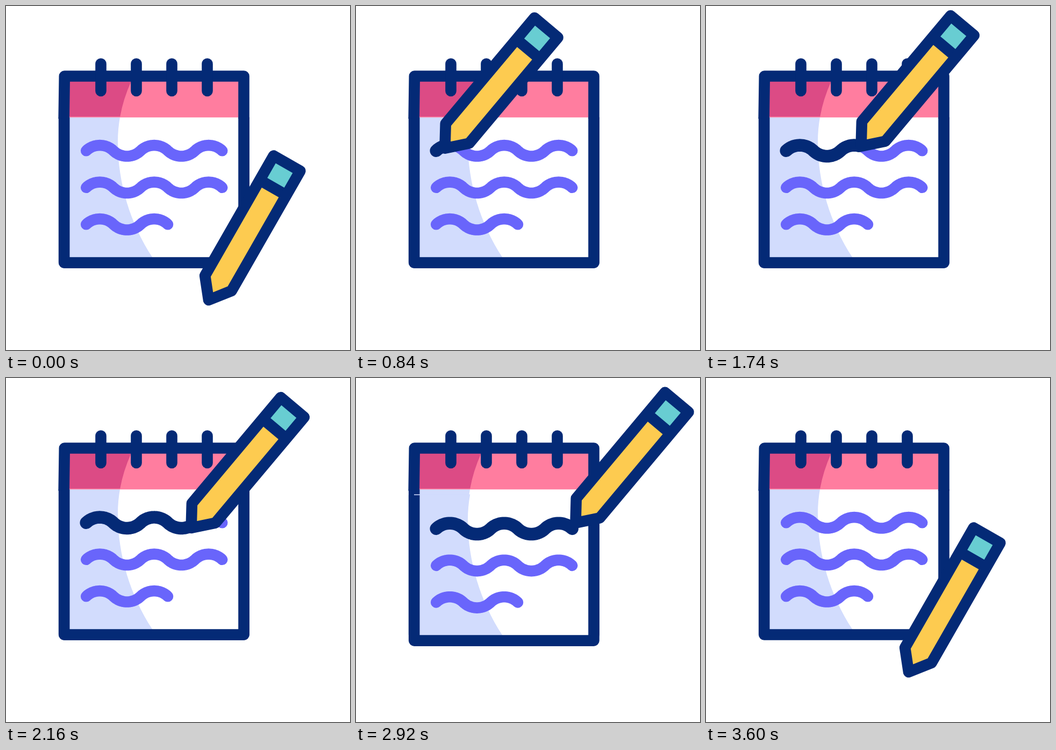
An HTML page with a canvas for the animation above (3620 ms loop, 640 px wide and 640 px high).

```html
<!DOCTYPE html>
<html lang="en">
<head>
<meta charset="utf-8">
<title>Notepad and pencil</title>
<style>
  html, body { margin: 0; width: 100%; height: 100%; overflow: hidden; background: #fff; }
  canvas { display: block; width: 640px; height: 640px; }
</style>
</head>
<body>
<canvas id="stage" width="640" height="640"></canvas>
<script>
const ctx = document.getElementById('stage').getContext('2d');
const LOOP = 3620;
const NAVY = '#042a76', PURPLE = '#6965fb', PINK = '#ff7d9f', ROSE = '#dc4b85',
      LAVENDER = '#d2dcfd', YELLOW = '#fdcb50', TEAL = '#68cdd2';
const LINE = 20.6;
const WAVE_X = 149.2, HALF_WAVE = 50.6;

const progress = (t, from, to) => Math.min(1, Math.max(0, (t - from) / (to - from)));
const mix = (a, b, k) => a + (b - a) * k;

function ease(p) {
  const a = p ** 2.5, b = (1 - p) ** 2.5;
  return a / (a + b);
}

const quad = (a, b, c, s) =>
  a.map((v, i) => (1 - s) ** 2 * v + 2 * s * (1 - s) * b[i] + s * s * c[i]);

// Point on the wavy line after q half waves, relative to its start.
function wavePoint(q) {
  const n = Math.floor(q), u = q - n, v = 1 - u;
  const x = 3 * v * v * u * 14 + 3 * v * u * u * 36.6 + u ** 3 * HALF_WAVE;
  const y = 40.8 * u * v * (n % 2 ? 1 : -1);
  return [n * HALF_WAVE + x, y];
}

function stroke(points, color, width = LINE, cap = 'round') {
  ctx.beginPath();
  points.forEach(([x, y]) => ctx.lineTo(x, y));
  ctx.strokeStyle = color;
  ctx.lineWidth = width;
  ctx.lineCap = cap;
  ctx.lineJoin = 'round';
  ctx.stroke();
}

function wave(y, halves, color, width) {
  const steps = Math.max(1, Math.ceil(halves * 24));
  const points = [];
  for (let i = 0; i <= steps; i++) {
    const [dx, dy] = wavePoint(halves * i / steps);
    points.push([WAVE_X + dx, y + dy]);
  }
  stroke(points, color, width);
}

// Left side of the paper, bounded by the curved edge of the shade.
function shade(color, top, bottom) {
  ctx.save();
  ctx.beginPath();
  ctx.rect(108, top, 334, bottom - top);
  ctx.clip();
  ctx.beginPath();
  ctx.moveTo(108, 140);
  ctx.lineTo(233, 140);
  ctx.quadraticCurveTo(208, 195, 208, 253);
  ctx.bezierCurveTo(208, 330, 232, 406, 272, 467);
  ctx.lineTo(278, 476);
  ctx.lineTo(108, 476);
  ctx.fillStyle = color;
  ctx.fill();
  ctx.restore();
}

function page(drop, written) {
  ctx.save();
  ctx.translate(0, drop);
  ctx.fillStyle = '#fff';
  ctx.fillRect(108, 207, 334, 270);
  shade(LAVENDER, 205.5, 477);
  stroke([[108.2, 207], [108.2, 477.5], [442.5, 477.5], [442.5, 207]], NAVY, LINE, 'butt');
  wave(269.3, 5, PURPLE);
  wave(337.8, 5, PURPLE);
  wave(406.3, 3, PURPLE);
  if (written > 0) wave(269.3, 5 * written, NAVY, 23.5);
  ctx.restore();
}

function header() {
  ctx.fillStyle = PINK;
  ctx.fillRect(108, 130, 334, 77.3);
  shade(ROSE, 130, 205.8);
  stroke([[107.7, 210], [108.8, 130.5], [442.5, 130.5], [442.5, 210]], NAVY, LINE, 'butt');
  for (let i = 0; i < 4; i++) {
    const x = 176.5 + 66 * i;
    stroke([[x, 107.6], [x, 158]], NAVY);
  }
}

function pencil([x, y], degrees) {
  ctx.save();
  ctx.translate(x, y);
  ctx.rotate(degrees * Math.PI / 180);
  const outline = [[0, 0], [-28.5, -36], [-28.5, -293], [28.5, -293], [28.5, -36], [0, 0], [-28.5, -36]];
  ctx.beginPath();
  outline.forEach(p => ctx.lineTo(...p));
  ctx.fillStyle = YELLOW;
  ctx.fill();
  ctx.fillStyle = TEAL;
  ctx.fillRect(-28.5, -293, 57, 52);
  stroke([[-28.5, -241], [28.5, -241]], NAVY, LINE, 'butt');
  stroke(outline, NAVY);
  ctx.restore();
}

const REST = [377, 547];

// Tip position while writing; it trails the line slightly.
function writingTip(k) {
  const x = 152 + 256.5 * k;
  const [, dy] = wavePoint((x - 7.5 - WAVE_X) / HALF_WAVE);
  return [x, 270.6 + dy];
}

function draw(t) {
  const p = progress(t, 740, 2680);
  const written = p + 0.128 * p * p * (1 - p);
  const drop = 460 * ease(progress(t, 2840, 3277));

  ctx.fillStyle = '#fff';
  ctx.fillRect(0, 0, 640, 640);
  page(0, 0);
  if (drop < 455) page(drop, written);
  header();

  let tip;
  if (t < 600) {
    tip = quad(REST, [179, 507], writingTip(0), ease(t / 600));
  } else if (t < 3160) {
    tip = writingTip(written);
  } else {
    tip = quad(writingTip(1), [420, 407], REST, ease(progress(t, 3160, 3600)));
  }
  const tilt = ease(progress(t, 0, 600)) - ease(progress(t, 2860, 3600));
  pencil(tip, mix(29.8, 40, tilt));
}

const start = performance.now();
function tick() {
  draw((performance.now() - start) % LOOP);
  requestAnimationFrame(tick);
}
tick();
</script>
</body>
</html>
```
